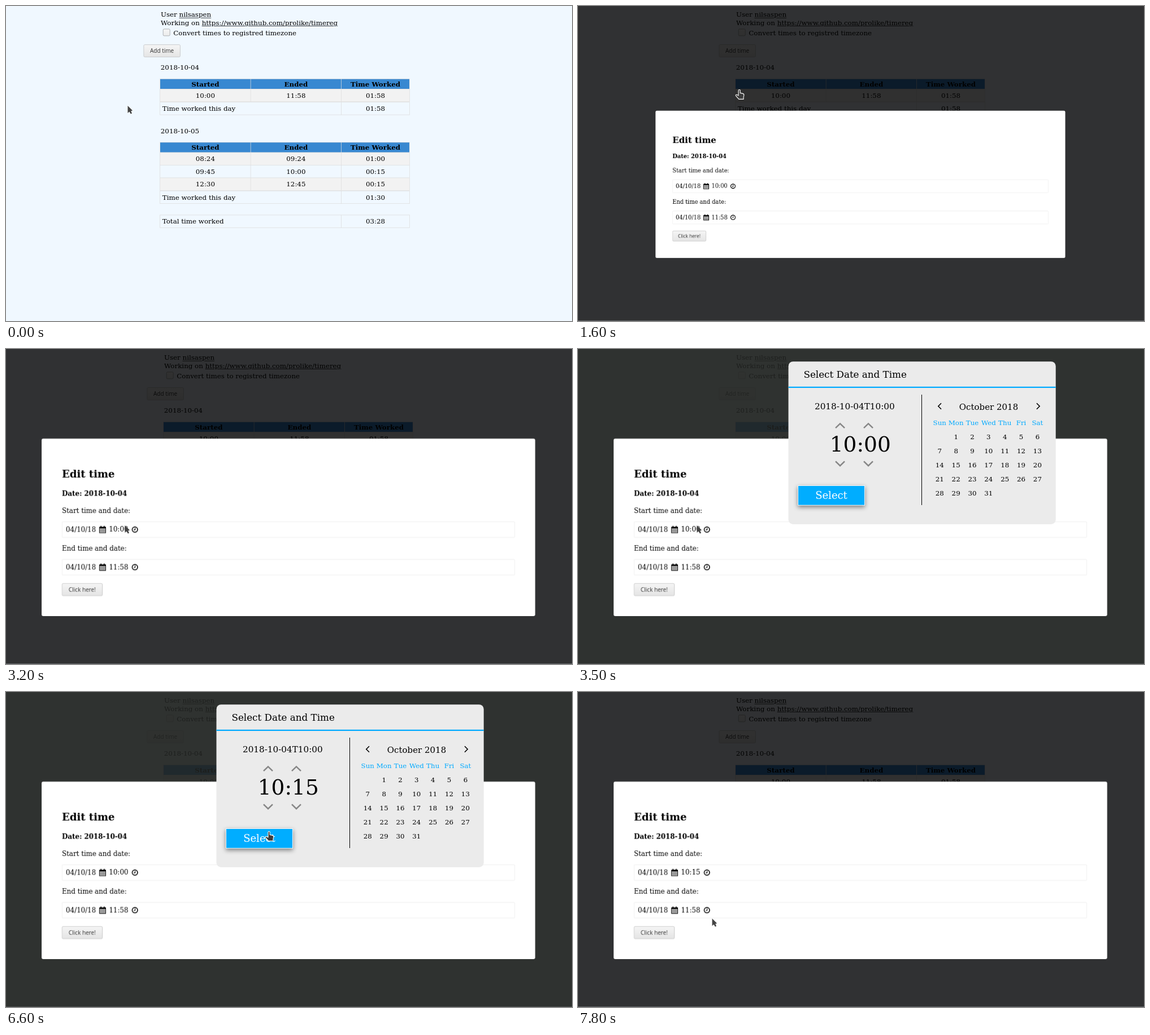
An HTML page for the animation above (8000 ms loop, 1002 px wide and 559 px high).

```html
<!DOCTYPE html>
<html lang="en">
<head>
<meta charset="utf-8">
<title>Time registration</title>
<style>
html, body { margin: 0; width: 100%; height: 100%; overflow: hidden; background: #f0f8ff; }
#view { position: relative; width: 100%; height: 100%; overflow: hidden; contain: strict; }

/* The page is laid out in units of 4/3 pixel and shown at three quarters. */
#stage {
  position: absolute; left: 0; top: 0; width: 1336px; height: 745px;
  transform: scale(.75); transform-origin: 0 0;
  font: 15.8px/20px "DejaVu Serif", serif; color: #000;
}
.layer, .layer > svg { position: absolute; left: 0; top: 0; width: 1336px; height: 745.33px; }

/* --x, --y, --w, --h are screen pixels */
.t, .b, .grid {
  --left: calc(var(--x) * 4px / 3); --top: calc(var(--y) * 4px / 3);
  position: absolute; left: 0; top: 0;
  transform: translate(var(--left), var(--top));
}
.t { white-space: pre; transform: translate(var(--left), calc(var(--top) - 50%)); }
.c { transform: translate(calc(var(--left) - 50%), calc(var(--top) - 50%)); }
.b { box-sizing: border-box; width: calc(var(--w) * 4px / 3); height: calc(var(--h) * 4px / 3); }
u { text-underline-offset: 2px; text-decoration-thickness: 1px; }

.btn {
  display: flex; align-items: center; justify-content: center;
  font: 13.33px "Open Sans", sans-serif; color: #333;
  border: 1px solid #bcbcbc; border-radius: 3px;
  background: linear-gradient(#f5f5f5, #e5e5e5);
}
.check { border: 1px solid #9a9a9a; border-radius: 3px; background: linear-gradient(#f6f6f6, #ececec); }

.grid {
  display: grid; grid-template-columns: 213px 213px 1fr; gap: 1px;
  box-sizing: border-box; width: 590px; padding: 1px; background: #ddd;
}
.grid > * { height: 29px; line-height: 29px; text-align: center; background: #f0f8ff; }
.grid > b { height: 23px; line-height: 23px; background: #3888d1; }
.grid > .odd { background: #f2f2f2; }
.grid > .sum { grid-column: span 2; text-align: left; padding-left: 5px; }

.input { border: 1px solid #ececec; border-radius: 2px; }
.box { background: #fff; border-radius: 4px; }
.panel { background: #ebebeb; border-radius: 11px; }
.day { color: #0af; }
.select {
  display: flex; align-items: center; justify-content: center;
  font-size: 24px; color: #fff; background: #00adff;
  box-shadow: 0 0 0 1.33px #f4f9fc, 0 4px 10px 1px rgba(0, 0, 0, .45);
}
.swap { display: inline-grid; }
.swap > * { grid-area: 1 / 1; }

/* timeline: 1% is 80 ms */
.page, .shade, .dim, .modal, .modal .zoom, .picker, .hover, .swap > *, .lit, #cursor, #cursor g {
  animation: 8s step-end infinite;
}
.page { animation-name: shift; }
.shade { background: rgba(0, 0, 0, .8); animation-name: open; }
.modal { animation-name: open; }
.modal .zoom { transform-origin: 666.7px 422px; animation-name: bounce; }
.dim { background: rgba(48, 50, 48, .6); animation-name: pick; }
.picker { animation-name: pick; }
.grid > .hover { animation-name: hover; }
.minute > :first-child { animation-name: minute-old; }
.minute > :last-child { animation-name: minute-new; }
.start > :first-child { animation-name: start-old; }
.start > :last-child { animation-name: start-new; }
.lit { animation-name: lit; }

@keyframes shift { 0% { transform: none } 20%, 100% { transform: translateX(8px) } }
@keyframes open { 0% { opacity: 0 } 20%, 100% { opacity: 1 } }
@keyframes bounce {
  0%, 20% { transform: scale(.83) } 21.25% { transform: scale(.998) }
  22.5% { transform: scale(1.017) } 23.75%, 100% { transform: scale(1) }
}
@keyframes pick { 0%, 87.5%, 100% { opacity: 0 } 43.75% { opacity: 1 } }
@keyframes hover { 0%, 20%, 100% { background: #f2f2f2 } 12.5% { background: #ddd } }
@keyframes minute-old { 0% { opacity: 1 } 65%, 100% { opacity: 0 } }
@keyframes minute-new { 0% { opacity: 0 } 65%, 100% { opacity: 1 } }
@keyframes start-old { 0% { opacity: 1 } 87.5%, 100% { opacity: 0 } }
@keyframes start-new { 0% { opacity: 0 } 87.5%, 100% { opacity: 1 } }
@keyframes lit { 0%, 78.75%, 100% { stroke: #868686 } 62.5% { stroke: #555 } }

#pointer { position: absolute; left: 0; top: 0; width: 1002px; height: 559px; }
#cursor { animation-name: move; }
#cursor .arrow { animation-name: arrow; }
#cursor .hand { animation-name: hand; }
#cursor .beam { animation-name: beam; }
@keyframes move {
  0%, 100% { transform: translate(215px, 177px) }
  7.5% { transform: translate(219px, 175px) }
  8.75% { transform: translate(231px, 169px) }
  10% { transform: translate(248px, 161px) }
  11.25% { transform: translate(267px, 154px) }
  12.5% { transform: translate(281px, 150px) }
  13.75% { transform: translate(287px, 148px) }
  16.25% { transform: translate(286px, 149px) }
  26.25% { transform: translate(284px, 150px) }
  28.75% { transform: translate(276px, 162px) }
  30% { transform: translate(259px, 182px) }
  38.75% { transform: translate(236px, 245px) }
  40% { transform: translate(210px, 313px) }
  51.25% { transform: translate(262px, 291px) }
  52.5% { transform: translate(301px, 273px) }
  55% { transform: translate(371px, 236px) }
  57.5% { transform: translate(454px, 182px) }
  60% { transform: translate(498px, 142px) }
  62.5% { transform: translate(522px, 132px) }
  72.5% { transform: translate(519px, 146px) }
  78.75% { transform: translate(477px, 227px) }
  82.5% { transform: translate(466px, 248px) }
  87.5% { transform: translate(465px, 249px) }
  91.25% { transform: translate(439px, 283px) }
  93.75% { transform: translate(360px, 334px) }
  95% { transform: translate(287px, 381px) }
  97.5% { transform: translate(237px, 402px) }
}
@keyframes arrow {
  0%, 28.75%, 60%, 78.75%, 87.5%, 100% { opacity: 1 }
  20%, 57.5%, 62.5%, 82.5% { opacity: 0 }
}
@keyframes hand {
  0%, 28.75%, 78.75%, 87.5%, 100% { opacity: 0 }
  20%, 62.5%, 82.5% { opacity: 1 }
}
@keyframes beam { 0%, 60%, 100% { opacity: 0 } 57.5% { opacity: 1 } }
</style>
</head>
<body>
<div id="view">
<div id="stage">
  <div class="layer page">
    <div class="t" style="--x:274;--y:15.5">User <u>nilsaspen</u></div>
    <div class="t" style="--x:274;--y:29.9">Working on <u>https://www.github.com/prolike/timereg</u></div>
    <div class="b check" style="--x:277.8;--y:40.5;--w:12.4;--h:12.4"></div>
    <div class="t" style="--x:296.3;--y:48.6">Convert times to registred timezone</div>
    <div class="b btn" style="--x:243.5;--y:68.3;--w:65.2;--h:22.2">Add time</div>

    <div class="t" style="--x:273.8;--y:109.5">2018-10-04</div>
    <div class="grid" style="--x:272.25;--y:129">
      <b>Started</b><b>Ended</b><b>Time Worked</b>
      <span class="odd hover">10:00</span><span class="odd hover">11:58</span><span class="odd hover">01:58</span>
    </div>
    <div class="grid" style="--x:272.25;--y:170.25"><span class="sum">Time worked this day</span><span>01:58</span></div>

    <div class="t" style="--x:273.8;--y:221.8">2018-10-05</div>
    <div class="grid" style="--x:272.25;--y:241.5">
      <b>Started</b><b>Ended</b><b>Time Worked</b>
      <span class="odd">08:24</span><span class="odd">09:24</span><span class="odd">01:00</span>
      <span>09:45</span><span>10:00</span><span>00:15</span>
      <span class="odd">12:30</span><span class="odd">12:45</span><span class="odd">00:15</span>
    </div>
    <div class="grid" style="--x:272.25;--y:327.75"><span class="sum">Time worked this day</span><span>01:30</span></div>
    <div class="grid" style="--x:272.25;--y:370.5"><span class="sum">Total time worked</span><span>03:28</span></div>
  </div>

  <div class="layer shade"></div>
  <div class="layer dim"></div>

  <div class="layer modal"><div class="layer zoom">
    <div class="b box" style="--x:63;--y:159;--w:874;--h:315"></div>
    <b class="t" style="--x:99;--y:222;font-size:24px">Edit time</b>
    <b class="t" style="--x:99;--y:256.8">Date: 2018-10-04</b>
    <div class="t" style="--x:99;--y:287">Start time and date:</div>
    <div class="b input" style="--x:99;--y:306.2;--w:801.5;--h:28.3"></div>
    <div class="t" style="--x:106;--y:320.5">04/10/18</div>
    <div class="t" style="--x:182.3;--y:320.5"><span class="swap start"><span>10:00</span><span>10:15</span></span></div>
    <div class="t" style="--x:99;--y:353.7">End time and date:</div>
    <div class="b input" style="--x:99;--y:373;--w:801.5;--h:28.3"></div>
    <div class="t" style="--x:106;--y:387.2">04/10/18</div>
    <div class="t" style="--x:182.3;--y:387.2">11:58</div>
    <div class="b btn" style="--x:99;--y:415.7;--w:71.7;--h:22.2">Click here!</div>
    <svg viewBox="0 0 1002 559" fill="none" stroke="#000">
      <defs><g id="icons">
        <path d="M.6 2.2H11.4V12.4H.6Z" stroke-width="1.1"/>
        <path d="M.6 2H11.4V4.6H.6Z" fill="#000" stroke="none"/>
        <path d="M3.3 4V12M6 4V12M8.7 4V12M1 7.1H11M1 9.7H11" stroke-width=".6"/>
        <path d="M3.2 .2V3M8.8 .2V3" stroke-width="1.7"/>
        <circle cx="63.2" cy="6.6" r="4.7" stroke-width="1.6"/>
        <path d="M63.6 3.8V7.1H61.2" stroke-width="1.1"/>
      </g></defs>
      <use href="#icons" x="165" y="313.8"/>
      <use href="#icons" x="165" y="380.5"/>
    </svg>
  </div></div>

  <div class="layer picker" id="picker">
    <div class="b panel" style="--x:372.5;--y:22.2;--w:473.3;--h:288.5"></div>
    <div class="t" style="--x:399.5;--y:44.5;font-size:22.3px">Select Date and Time</div>
    <div class="b" style="--x:372.5;--y:66.8;--w:473.3;--h:2.25;background:#0af"></div>
    <div class="t c" style="--x:489.8;--y:101.8;font-size:20.3px">2018-10-04T10:00</div>
    <div class="t c" style="--x:499.7;--y:169;font-size:50px;line-height:60px">10:<span class="swap minute"><span>00</span><span>15</span></span></div>
    <div class="b select" style="--x:390;--y:243;--w:117;--h:34">Select</div>
    <div class="t c" style="--x:727;--y:102.3;font-size:20px">October 2018</div>
    <svg viewBox="0 0 1002 559" fill="none" stroke="#868686" stroke-width="2.5">
      <path d="M456 140.2L464 132.4L472 140.2M456 199.4L464 207.2L472 199.4M506 199.4L514 207.2L522 199.4"/>
      <path class="lit" d="M506 140.2L514 132.4L522 140.2"/>
      <path d="M608.5 81V277" stroke="#000" stroke-width="1"/>
      <path d="M643 96.3L637.8 101.5L643 106.7M812 96.3L817.2 101.5L812 106.7" stroke="#000" stroke-width="1.6"/>
    </svg>
  </div>
</div>

<svg id="pointer" viewBox="0 0 1002 559"><g id="cursor">
  <g class="arrow">
    <path d="M.5 0V13L3.4 10.6L5.8 14.6L8 13.4L6.2 9.4L9 8.4Z" fill="#444" stroke="#fff" stroke-opacity=".45" stroke-width="1.4" paint-order="stroke"/>
  </g>
  <g class="hand">
    <path d="M-2 1.2Q-2-.5-.4-.5T1.2 1.2V5.4L5.8 6.4Q8 7 7.8 9.2L7 13V16.4H-1.2L-6.4 10.6Q-7.4 9-5.8 8.3Q-4.2 8-2 10Z" fill="#3d3d3d" stroke="#fff" stroke-width="1.1" stroke-linejoin="round"/>
  </g>
  <g class="beam">
    <path d="M-2.6-7.2Q0-7.2 0-5.6Q0-7.2 2.6-7.2M0-6V6M-2.6 7.2Q0 7.2 0 5.6Q0 7.2 2.6 7.2" fill="none" stroke="#444" stroke-width="1.3"/>
  </g>
</g></svg>
</div>

<script>
const picker = document.getElementById('picker');

function cell(text, col, row, cls = '') {
  const el = document.createElement('div');
  el.className = 't c ' + cls;
  el.textContent = text;
  el.style.setProperty('--x', 640.3 + col * 28.85);
  el.style.setProperty('--y', 131.6 + row * 25);
  picker.append(el);
}

['Sun', 'Mon', 'Tue', 'Wed', 'Thu', 'Fri', 'Sat'].forEach((d, i) => cell(d, i, 0, 'day'));
for (let d = 1; d <= 31; d++) cell(d, d % 7, 1 + Math.floor(d / 7));
</script>
</body>
</html>
```
